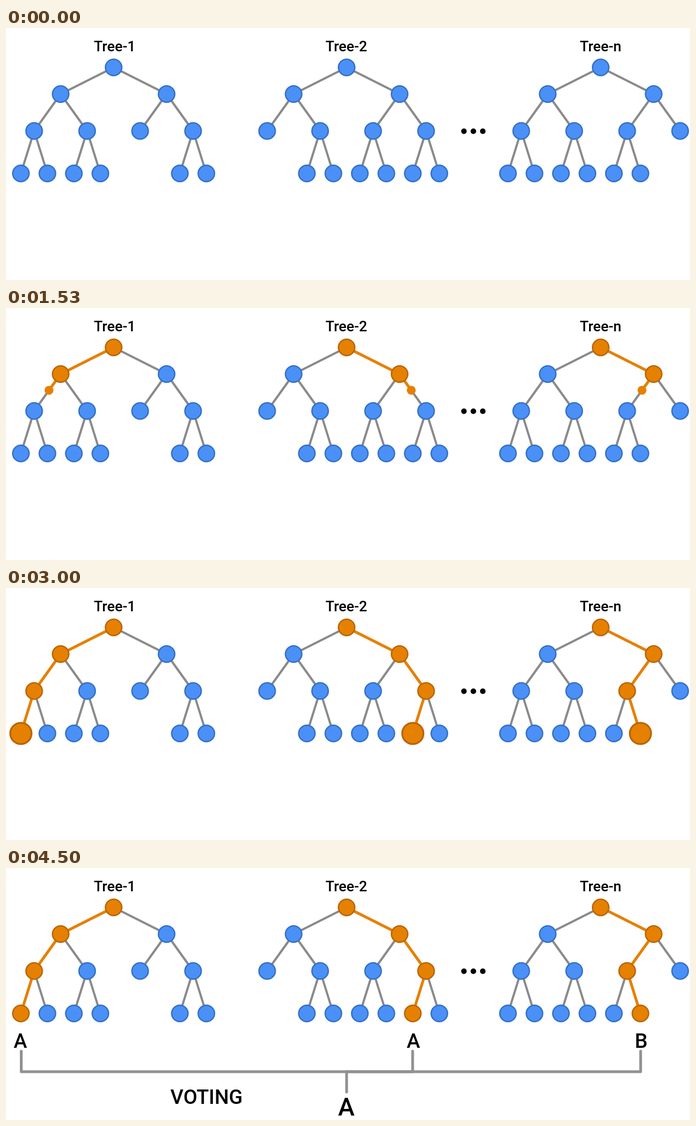
An HTML page with a canvas that plays this animation: 1233x454 px, repeating every 5850 ms.

```html
<!DOCTYPE html>
<html lang="en">
<head>
<meta charset="utf-8">
<title>Tree voting</title>
<style>
html, body { margin: 0; width: 100%; height: 100%; overflow: hidden; background: #fff; }
canvas { display: block; }
</style>
</head>
<body>
<canvas id="stage" width="1233" height="454"></canvas>
<script>
const ctx = document.getElementById('stage').getContext('2d');
const LOOP = 5850, STEP = 30, START = 150, LEVEL = 900, PULSE = 300;
const LEVEL_Y = [71, 119, 185.5, 262];
const SPREAD = [95.5, 47.75, 23.9];
const BLUE = [74, 144, 247], BLUE_RIM = [52, 113, 200];
const ORANGE = [230, 128, 0], ORANGE_RIM = [184, 102, 6];
const GRAY = '#8a8a8a', BRACKET = '#919191';

// path: chosen branch per level; bare: the third-level node without children
const trees = [
  { x: 194, title: 'Tree-1', titleX: 158.4, path: '000', bare: '10' },
  { x: 614, title: 'Tree-2', titleX: 576, path: '110', bare: '00' },
  { x: 1072, title: 'Tree-n', titleX: 1034.5, path: '101', bare: '11' }
];

const clamp = v => Math.max(0, Math.min(1, v));
const progress = (t, start, length) => clamp((t - start) / length);
const hump = u => 1 - Math.abs(2 * u - 1);
const rgb = c => `rgb(${c.join()})`;
const mix = (a, b, u) => rgb(a.map((v, i) => Math.round(v + (b[i] - v) * u)));

function buildTree(tree) {
  tree.nodes = [];
  (function add(key, x, parent) {
    const depth = key.length;
    const node = { x, y: LEVEL_Y[depth], depth, parent, active: tree.path.startsWith(key) };
    tree.nodes.push(node);
    if (depth === 3 || key === tree.bare) return;
    add(key + '0', x - SPREAD[depth], node);
    add(key + '1', x + SPREAD[depth], node);
  })('', tree.x, null);
}

function disc(x, y, r, fill) {
  ctx.beginPath();
  ctx.arc(x, y, r, 0, Math.PI * 2);
  ctx.fillStyle = fill;
  ctx.fill();
}

function line(points, color, width, cap = 'butt') {
  ctx.beginPath();
  points.forEach(([x, y]) => ctx.lineTo(x, y));
  ctx.strokeStyle = color;
  ctx.lineWidth = width;
  ctx.lineCap = cap;
  ctx.lineJoin = 'round';
  ctx.stroke();
}

function text(str, x, y, size, align = 'left') {
  ctx.font = `500 ${size}px Roboto, sans-serif`;
  ctx.textAlign = align;
  ctx.fillStyle = '#000';
  ctx.fillText(str, x, y);
}

// Text that pops in, growing from its baseline
function popText(str, x, y, size, t, start) {
  if (t <= start) return;
  text(str, x, y, size * (1 + 0.3 * hump(progress(t, start, 150))), 'center');
}

function drawNode({ x, y, depth, active }, t) {
  const u = active ? progress(t, START + depth * LEVEL, PULSE) : 0;
  const tint = clamp(u * 2);
  const scale = 1 + 0.3 * hump(u);
  disc(x, y, 14.75 * scale, mix(BLUE, ORANGE, tint));
  ctx.strokeStyle = mix(BLUE_RIM, ORANGE_RIM, tint);
  ctx.lineWidth = 2.5 * scale;
  ctx.stroke();
}

function drawTree({ nodes, title, titleX }, t) {
  const edges = nodes.filter(n => n.parent);
  for (const n of edges) line([[n.parent.x, n.parent.y], [n.x, n.y]], GRAY, 4);
  for (const n of edges.filter(n => n.active)) {
    const p = n.parent;
    const u = progress(t, START + p.depth * LEVEL + PULSE / 2, LEVEL - PULSE / 2);
    if (!u) continue;
    const x = p.x + (n.x - p.x) * u, y = p.y + (n.y - p.y) * u;
    line([[p.x, p.y], [x, y]], rgb(ORANGE), 5);
    disc(x, y, 8, rgb(ORANGE));
  }
  nodes.forEach(n => drawNode(n, t));
  text(title, titleX, 42, 26);
}

// Line from a leaf down and across to the centre, cut off at fraction u
function drawBracket(x, u) {
  const top = 330, bottom = 367, centre = 614;
  const drop = bottom - top, run = centre - x;
  const length = u * (drop + Math.abs(run));
  const points = [[x, top], [x, top + Math.min(length, drop)]];
  if (length > drop) points.push([x + Math.sign(run) * (length - drop), bottom]);
  line(points, BRACKET, 5, 'round');
}

function draw(t) {
  ctx.fillStyle = '#fff';
  ctx.fillRect(0, 0, 1233, 454);
  trees.forEach(tree => drawTree(tree, t));
  for (const x of [825.5, 842.5, 859.5]) disc(x, 186, 5, '#000');

  popText('A', 26, 323.5, 36.5, t, 3000);
  popText('A', 734.5, 323.5, 36.5, t, 3000);
  popText('B', 1145, 323.5, 36.5, t, 3000);

  const join = progress(t, 3300, 600);
  if (join) [27.5, 733, 1144].forEach(x => drawBracket(x, join));
  popText('VOTING', 361.5, 424.5, 36.5, t, 3300);

  const stem = progress(t, 3900, 300);
  if (stem) line([[614, 367], [614, 367 + 36.5 * stem]], BRACKET, 5, 'round');
  popText('A', 613.5, 445.5, 45, t, 4350);
}

trees.forEach(buildTree);
const begin = performance.now();
function frame() {
  const t = (performance.now() - begin) % LOOP;
  draw(Math.floor(t / STEP) * STEP);
  requestAnimationFrame(frame);
}
frame();
</script>
</body>
</html>
```
